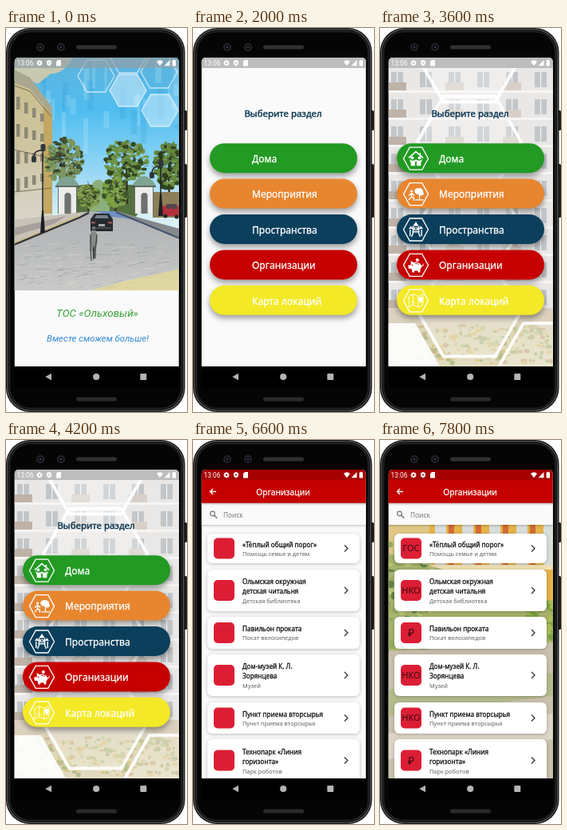
Animation, 227 px wide and 480 px high, one loop 8 s. Source, as an HTML page with a canvas:

```html
<!DOCTYPE html>
<html lang="ru">
<head>
<meta charset="utf-8">
<title>App tour</title>
<style>
html, body { margin: 0; width: 100%; height: 100%; overflow: hidden; background: #fff; }
canvas { display: block; width: 227px; height: 480px; }
</style>
</head>
<body>
<canvas id="stage"></canvas>
<script>
const W = 227, H = 480, LOOP = 8000;
const SANS = '"Noto Sans", "Open Sans", sans-serif';
const HAND = 'Roboto, "Open Sans", sans-serif';
const LEFT = 10.8, WIDE = 206;
const canvas = document.getElementById('stage');
const ratio = window.devicePixelRatio || 1;
canvas.width = W * ratio;
canvas.height = H * ratio;
const c = canvas.getContext('2d');

let seed = 1;
function rnd(a = 0, b = 1) {
  seed = (seed * 16807) % 2147483647;
  return a + (b - a) * seed / 2147483647;
}

function rect(x, y, w, h, fill) {
  c.fillStyle = fill;
  c.fillRect(x, y, w, h);
}

function round(x, y, w, h, r, fill) {
  c.beginPath();
  c.roundRect(x, y, w, h, r);
  c.fillStyle = fill;
  c.fill();
}

function disc(x, y, rx, fill, ry = rx) {
  c.beginPath();
  c.ellipse(x, y, rx, ry, 0, 0, 7);
  c.fillStyle = fill;
  c.fill();
}

function shape(d, fill) {
  c.fillStyle = fill;
  c.fill(new Path2D(d), 'evenodd');
}

function line(d, color, width = 1) {
  c.strokeStyle = color;
  c.lineWidth = width;
  c.stroke(new Path2D(d));
}

function fade(y0, y1, ...colors) {
  const g = c.createLinearGradient(0, y0, 0, y1);
  colors.forEach((col, i) => g.addColorStop(i / (colors.length - 1), col));
  return g;
}

// A thin outline of the same colour gives a medium weight.
function text(s, x, y, font, fill, align = 'left', outline = 0) {
  c.font = font;
  c.fillStyle = c.strokeStyle = fill;
  c.textAlign = align;
  c.fillText(s, x, y);
  if (outline) {
    c.lineWidth = outline;
    c.lineJoin = 'round';
    c.strokeText(s, x, y);
    c.lineJoin = 'miter';
  }
}

function shadow(color, blur, dy) {
  c.shadowColor = color;
  c.shadowBlur = blur * ratio;
  c.shadowOffsetY = dy * ratio;
}

function at(x, y, draw) {
  c.save();
  c.translate(x, y);
  draw();
  c.restore();
}

function clipped(x, y, w, h, r, draw) {
  c.save();
  c.beginPath();
  c.roundRect(x, y, w, h, r);
  c.clip();
  draw();
  c.restore();
}

function hexPath(x, y, rx, ry = rx * 0.87) {
  const h = rx / 2;
  return `M${x - rx} ${y}L${x - h} ${y - ry}H${x + h}L${x + rx} ${y}L${x + h} ${y + ry}H${x - h}Z`;
}

function phone() {
  rect(0, 0, W, H, '#fff');
  round(223, 103, 4, 25, 1.5, '#1c1c1d');
  round(223, 170, 4, 67, 1.5, '#1c1c1d');
  ['#161616', '#555', '#0c0c0c', '#2b2b2b', '#050505'].forEach((color, i) => {
    const inset = i * 1.3;
    round(inset, inset, 224.5 - 2 * inset, 480 - 2 * inset, 30 - inset, color);
  });
  round(88, 21.5, 51, 5, 2.5, '#303030');
  round(88, 461.5, 51, 5, 2.5, '#2a2a2a');
  for (const x of [43, 69]) {
    disc(x, 24, 5, '#25272b');
    disc(x, 24, 3.2, '#0c0d12');
    disc(x, 24, 1.3, '#343a4c');
  }
  rect(LEFT, 423, WIDE, 27, '#000');
  shape('M49.3 436L57 431.7V440.3Z', '#b4b4b4');
  disc(113.2, 436, 4.1, '#b4b4b4');
  round(168.3, 432, 8, 8, 1, '#b4b4b4');
}

function statusBar(fill) {
  rect(10, 37, 208, 13, fill);
  text('13:06', 13.5, 46.8, '8.4px Roboto, sans-serif', '#fff');
  disc(42, 43.7, 2.9, '#fff');
  for (let i = 0; i < 8; i++) {
    const a = i * Math.PI / 4;
    disc(42 + 3 * Math.cos(a), 43.7 + 3 * Math.sin(a), 0.7, '#fff');
  }
  disc(42, 43.7, 1.2, fill);
  shape('M54 40L57 41.2V44Q57 46.5 54 47.6Q51 46.5 51 44V41.2Z', '#fff');
  disc(54, 43.5, 1.1, fill);
  shape('M65 40H69V47.5H63V42Z', '#fff');
  shape('M189 42Q193 38.6 197 42L193 47.3Z', '#fff');
  shape('M205.5 40V47.2H198.6Z', '#fff');
  shape('M208.6 40.6H209.8V39.8H211.8V40.6H213V47.4H208.6Z', '#fff');
}

function tree(x, y, rx, ry, light, dark) {
  line(`M${x} ${y}L${x + 1} ${y + ry + 30}`, '#3c3424', 2.5);
  for (let i = 0; i < 150; i++) {
    const a = rnd(0, 6.28), r = Math.sqrt(rnd());
    const px = x + Math.cos(a) * r * rx, py = y + Math.sin(a) * r * ry;
    disc(px, py, rnd(1.5, 4.5), i % 3 ? light : dark, rnd(1.5, 3.5));
  }
  c.globalAlpha = 0.6;
  for (let i = 0; i < 70; i++) {
    const a = rnd(0, 6.28), r = rnd(0.1, 1);
    const px = x + Math.cos(a) * r * rx, py = y + Math.sin(a) * r * ry;
    line(`M${px} ${py}l${rnd(-6, 6)} ${rnd(-6, 4)}`, i % 4 ? '#1d2117' : '#c3d3a4', 0.8);
  }
  c.globalAlpha = 1;
}

function gate(x, y, w) {
  round(x, y + 12, w, 36, 1, '#ecedea');
  shape(`M${x - 3} ${y + 13}Q${x + w / 2} ${y - 11} ${x + w + 3} ${y + 13}Z`, '#7fa392');
  line(`M${x - 3} ${y + 14}h${w + 6}`, '#35423b', 1.4);
  round(x + w * 0.35, y + 22, w * 0.34, 26, [4, 4, 0, 0], '#6d716f');
  line(`M${x + 0.5} ${y + 14}v34M${x + w - 0.5} ${y + 14}v34`, '#5d5f5a', 0.9);
}

function lamp(x, top, foot) {
  line(`M${x} ${top}V${foot}M${x - 11} ${top + 14}q0 -10 11 -9`, '#1d2023', 1.5);
  round(x - 14, top + 12, 6, 8, 2, '#30363b');
  round(x - 2.5, top - 3, 6, 9, 2, '#30363b');
  shape(`M${x - 3} ${foot + 4}L${x - 1} ${foot - 24}H${x + 1}L${x + 3} ${foot + 4}Z`, '#1d2023');
}

function street() {
  seed = 77;
  rect(10, 37, 208, 291, fade(37, 235, '#5fb3dc', '#50bdf0', '#8bd3f4', '#d9eff6'));
  c.globalAlpha = 0.2;
  for (let i = 0; i < 34; i++) {
    rect(rnd(45, 215), rnd(38, 115), rnd(3, 9), rnd(10, 45), i % 3 ? '#d7f2fa' : '#2b94d2');
  }
  c.globalAlpha = 1;
  shape('M10 37H84Q72 58 56 57L40 70L24 62L10 67Z', '#c9c9b2');

  // left building
  shape('M10 52L30 62L58 99V240H10Z', fade(60, 240, '#c9bd8b', '#cfc5a2', '#d8d5ca'));
  shape('M10 52L30 62L58 99V110L30 76L10 68Z', '#a8a68f');
  shape('M47 95L58 110V232H47Z', '#c3a762');
  for (let r = 0; r < 4; r++) {
    for (let i = 0; i < 4; i++) {
      rect(13 + i * 10, 86 + r * 34 + i * (7 - r * 3), 4.5, 16 - i * 2, '#8b8875');
    }
  }
  line('M10 72L30 79L57 111M10 152L57 163M10 205L57 200', '#6d6650', 0.9);

  // distant avenue
  round(88, 196, 78, 41, 8, '#55703f');
  shape('M104 202Q116 176 130 204V235H102Z', '#8cae7c');
  tree(73, 166, 23, 27, '#7c965d', '#414f30');
  tree(103, 210, 13, 13, '#829d4c', '#48622e');
  tree(151, 165, 27, 25, '#6d9346', '#35491f');
  tree(137, 205, 15, 18, '#7da044', '#3b562c');
  tree(204, 172, 18, 29, '#64883c', '#2f421f');
  rect(184, 205, 34, 32, '#8c7f58');
  gate(65, 184, 24);
  gate(161, 184, 24);

  // ground
  shape('M10 240L98 230L139 229L218 252V328H10Z', fade(230, 328, '#b0b2b5', '#babcbd', '#cacac8'));
  shape('M10 240L98 230L92 237L10 270Z', '#c9c2b8');
  shape('M10 250L75 235L60 245L10 260Z', '#a99f9c');
  shape('M137 229L218 251V262Z', '#85898c');
  shape('M112 229H138L160 239L132 236Z', '#6f8fc4');
  line('M10 271L92 237L104 231', '#35332e', 2.4);
  line('M10 268.5L90 235', '#cdb865', 1);
  line('M138 230L218 263', '#41516a', 2);
  c.globalAlpha = 0.35;
  for (let i = 0; i < 150; i++) {
    const x = rnd(10, 200), y = rnd(270, 326);
    line(`M${x} ${y}l${rnd(3, 14)} ${rnd(-3, 1)}`, i % 2 ? '#e6e6e3' : '#83878a', 1);
  }
  c.globalAlpha = 0.65;
  shape('M106 328L150 316L218 301V328Z', '#ebdd8e');
  c.globalAlpha = 1;

  // traffic
  round(195, 222, 23, 13, 4, '#b4303c');
  rect(201, 220, 13, 6, '#51464c');
  disc(200, 235, 2.5, '#222');
  disc(214, 236, 2.5, '#222');
  shape('M106 239L111 232H129L134 239V254H106Z', '#25292e');
  shape('M111 238L113 234H127L129 238Z', '#75818a');
  rect(107, 242, 5, 2.5, '#8d5553');
  rect(128, 242, 5, 2.5, '#8d5553');
  rect(116, 245, 8, 3, '#aaa');
  line('M108 250H132', '#6a6e71', 1);
  shape('M107 253H113L115 266L112 279H107L105 266Z', '#858a86');
  disc(110, 250, 2.3, '#6b6f6b');
  line('M106 258L106 276L107 291M114 258L112 278L112 288', '#3f4442', 1.3);
  disc(110, 281, 1.3, '#3f4442', 9);
  lamp(46, 148, 252);
  lamp(194, 168, 231);

  // honeycomb
  c.globalAlpha = 0.4;
  shape(hexPath(153, 78, 23), '#fff');
  shape(hexPath(193, 103, 23), '#fff');
  c.globalAlpha = 0.75;
  for (const [x, y] of [[113, 60], [153, 78], [192, 55], [193, 103], [153, 36]]) {
    line(hexPath(x, y, 23), '#e8f7fc', 1.3);
  }
  c.globalAlpha = 1;
}

function splash() {
  rect(10, 37, 208, 386, '#fafafa');
  clipped(10, 37, 208, 291, 0, street);
  statusBar('rgba(145,160,166,.7)');
  text('ТОС «Ольховый»', 114.5, 360.5, 'italic 13.4px ' + HAND, '#3ba43b', 'center');
  text('Вместе сможем больше!', 115, 391.5, 'italic 11.4px ' + HAND, '#318bd6', 'center');
}

function facade() {
  rect(10, 50, 208, 373, '#e9e8e7');
  for (let r = 0; r < 9; r++) {
    const y = 51 + r * 34;
    rect(10, y + 27, 208, 3, '#f6f5f4');
    for (let i = 0; i < 6; i++) {
      const x = 14 + i * 36;
      rect(x, y + 4, 15, 19, '#c3c6c9');
      rect(x + 7, y + 4, 1.2, 19, '#f4f4f3');
      if (i % 2 === 0) rect(x - 4, y + 17, 23, 10, i ? '#d8d0c8' : '#bfb2a7');
    }
  }
  rect(10, 350, 208, 73, fade(350, 423, '#dccfc2', '#dcd6b4', '#e3dcc0'));
  seed = 31;
  for (let i = 0; i < 220; i++) {
    const color = ['#c3c895', '#dcc98c', '#cdb68e', '#b7bd8c'][i % 4];
    disc(rnd(10, 217), rnd(372, 420), rnd(1.5, 4), color, rnd(1, 3));
  }
  shape(hexPath(13, 423, 62), 'rgba(255,255,255,.92)');
  shape(hexPath(211, 423, 62), 'rgba(255,255,255,.25)');
  line(hexPath(211, 423, 62), 'rgba(255,255,255,.92)', 4);
  for (let y = 36; y < 400; y += 106) {
    shape(hexPath(112, y, 65), 'rgba(255,255,255,.25)');
    line(hexPath(112, y, 65), 'rgba(255,255,255,.92)', 4);
  }
}

// Pictograms are drawn around their own centre.
const glyphs = [
  ink => {
    line('M-10 -1L0 -9.5L10 -1M6 -8V-5', '#fff', 1.8);
    for (const [x, y, r] of [[-5, -1, 2.1], [5, -1, 2.1], [0, 3, 1.6]]) disc(x, y, r, '#fff');
    shape('M-9 1L-5 3L-2 2L-1 6V10H-7V6ZM9 1L5 3L2 2L1 6V10H7V6Z', '#fff');
    line('M0 5V10', ink, 0.8);
  },
  () => {
    disc(4, -4, 6, '#fff', 4.5);
    disc(7, -1, 4, '#fff', 3);
    line('M5 -2V7M-1 8H11', '#fff', 1.4);
    disc(-6, -4, 1.8, '#fff');
    line('M-6 -1L-6 4L-10 8M-6 4L-3 5L-3 9M-10 2L-6 -1L-2 2', '#fff', 1.5);
  },
  ink => {
    shape('M-4 -5L0 -11L4 -5ZM-10 -1L-7 -5L-4 -1ZM10 -1L7 -5L4 -1Z', '#fff');
    line('M-4 -5V5M4 -5V5M-5 3H5M-8 0V9M8 0V9M-4 5L-6 10M4 5L6 10', '#fff', 1.6);
    rect(-3, -3, 6, 4, '#fff');
    rect(-1.2, -2, 2.4, 2, ink);
  },
  ink => {
    disc(0, 2, 8, '#fff', 6);
    shape('M-11 0H-7V5H-10ZM-7 -6L-2 -3L-7 1ZM-6 5H-2V10H-5ZM2 5H6V10H3Z', '#fff');
    disc(2, -7, 2.3, '#fff');
    disc(-5, 0, 0.9, ink);
    line('M-1 -2Q2 -3 4 -1', ink, 1);
    line('M8 1q3 1 2 -3', '#fff', 1.2);
  },
  () => {
    line('M-10 -6L-4 -9L3 -6L10 -9V6L3 9L-4 6L-10 9ZM-4 -9V6M3 -6V9', '#fff', 1);
    shape('M7 4Q2 -2 4 -4Q7 -7 10 -4Q11 -2 7 4Z', '#fff');
    line('M-8 3L-5 1L-1 4', '#fff', 1);
  }
];

const sections = [
  ['Дома', '#229a23'],
  ['Мероприятия', '#e88630'],
  ['Пространства', '#0b3f5c'],
  ['Организации', '#c60000'],
  ['Карта локаций', '#f3e926']
];

function menu(photo, icons) {
  rect(10, 37, 208, 386, '#fafafa');
  if (photo) clipped(10, 37, 208, 386, 0, facade);
  statusBar('#bdbdbd');
  text('Выберите раздел', 113, 111, '11.4px ' + SANS, '#0d3854', 'center', 0.45);
  sections.forEach(([name, color], i) => {
    const y = 162.7 + i * 44.4;
    shadow('rgba(0,0,0,.38)', 7, 4);
    round(21, y - 18.5, 185, 37, 18.5, color);
    shadow('transparent', 0, 0);
    text(name, 74, y + 5.3, '12px ' + SANS, '#fff', 'left', 0.3);
    if (icons) {
      at(45, y + 0.5, () => {
        line(hexPath(0, 0, 15.5, 14), '#fff', 1.3);
        c.scale(0.9, 0.9);
        glyphs[i](color);
      });
    }
  });
}

const cards = [
  [117, 37, ['«Тёплый общий порог»'], 'Помощь семье и детям', 'ГОС'],
  [162, 52, ['Ольмская окружная', 'детская читальня'], 'Детская библиотека', 'НКО'],
  [221, 40, ['Павильон проката'], 'Покат велосипедов', '₽'],
  [268, 52, ['Дом-музей К. Л.', 'Зорянцева'], 'Музей', 'НКО'],
  [328, 39, ['Пункт приема вторсырья'], 'Пункт приема вторсырья', 'НКО'],
  [374, 53, ['Технопарк «Линия', 'горизонта»'], 'Парк роботов', '₽']
];

function yard() {
  rect(10, 106, 208, 317, fade(106, 423, '#e2c887', '#d7c58b', '#b3ba81', '#d1c9b7', '#bdb8aa'));
  shape('M62 106H218V222L62 218Z', '#e5b348');
  for (let x = 69; x < 217; x += 34) {
    rect(x, 106, 14, 55, '#d8dedc');
    rect(x + 17, 106, 7, 110, '#d26b35');
  }
  rect(62, 156, 156, 6, '#efe0b1');
  shape('M10 142L218 202V262H10Z', '#a7b36b');
  seed = 12;
  for (let i = 0; i < 100; i++) {
    disc(rnd(10, 66), rnd(126, 263), rnd(2, 6), ['#668248', '#94aa60', '#b9c67c'][i % 3], rnd(1, 5));
    disc(rnd(185, 217), rnd(200, 267), rnd(2, 5), i % 2 ? '#7da044' : '#a9bd56');
  }
  shape('M10 264L218 253V423H10Z', '#cac1ae');
  shape('M10 312L218 291V320L10 345Z', '#b5bb8d');
  shape('M10 367L218 342V374L10 399Z', '#ddd5c8');
}

function card([y, h, title, sub, tag], photo) {
  const mid = y + h / 2, two = title.length > 1;
  shadow('rgba(0,0,0,.25)', 4, 1);
  round(18, y, 191, h, 6, '#fff');
  shadow('transparent', 0, 0);
  round(26, mid - 13, 26, 26, 5, '#dc1e35');
  if (photo) {
    const size = tag === '₽' ? 14 : 11;
    text(tag, 39, mid + size * 0.36, size + 'px ' + SANS, '#390912', 'center');
  }
  const first = mid + (two ? -8 : -2);
  title.forEach((s, i) => text(s, 62, first + i * 12.4, '8.15px ' + SANS, '#151515', 'left', 0.3));
  text(sub, 62, mid + (two ? 16.3 : 9.3), '7.35px ' + SANS, '#606060');
  line(`M190 ${mid - 4}l4 4l-4 4`, '#333', 1.3);
}

function list(photo) {
  rect(10, 37, 208, 386, '#fafafa');
  clipped(10, 78, 208, 345, 0, () => {
    if (photo) yard();
    cards.forEach(item => card(item, photo));
    shadow('rgba(0,0,0,.25)', 3, 1);
    rect(10, 78, 208, 28, '#fafafa');
    shadow('rgba(0,0,0,.4)', 3, 1);
    rect(10, 70, 208, 8.5, '#c60000');
  });
  statusBar('#a70000');
  rect(10, 50, 208, 28.5, '#c60000');
  line('M29 64.5H21.5M25 61L21.5 64.5L25 68', '#fff', 1.3);
  text('Организации', 113, 68.5, '10.2px ' + SANS, '#fff', 'center', 0.25);
  c.beginPath();
  c.arc(24.5, 92, 2.8, 0, 7);
  c.strokeStyle = '#777';
  c.lineWidth = 1.2;
  c.stroke();
  line('M26.6 94.1L30.2 97.7', '#777', 1.5);
  text('Поиск', 38, 97, '8.3px ' + SANS, '#777');
}

const scenes = [
  [0, splash],
  [2000, () => menu(false, false)],
  [2600, () => menu(false, true)],
  [2800, () => menu(true, true)],
  [6600, () => list(false)],
  [7200, () => list(true)]
];

let shown = null;
function frame(now) {
  const t = now % LOOP;
  const scene = scenes.filter(([start]) => t >= start).pop();
  if (scene !== shown) {
    shown = scene;
    c.setTransform(ratio, 0, 0, ratio, 0, 0);
    phone();
    clipped(LEFT, 37, WIDE, 386, [5, 5, 0, 0], scene[1]);
  }
  requestAnimationFrame(frame);
}
frame(performance.now());
</script>
</body>
</html>
```
